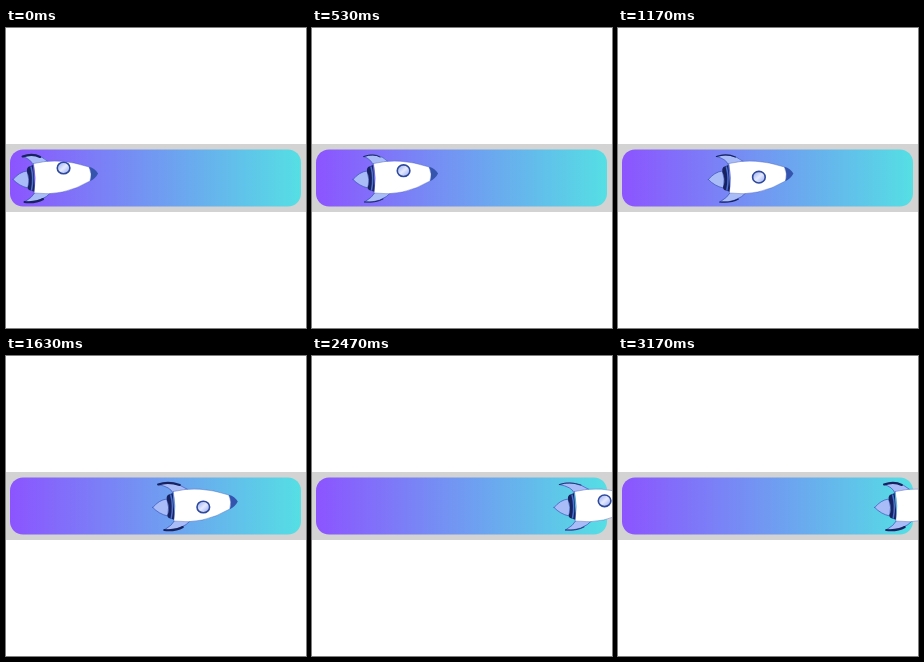
Write an HTML page that moves like this. It is 300 px wide and 300 px high and loops after 3.21 s.

```html
<!DOCTYPE html>
<html lang="en">
<head>
<meta charset="utf-8">
<title>Rocket progress bar</title>
<style>
html, body { margin: 0; width: 100%; height: 100%; overflow: hidden; background: #fff; }
svg { display: block; width: 100vw; height: 100vh; }
</style>
</head>
<body>
<svg viewBox="0 0 300 300">
  <defs>
    <linearGradient id="bar">
      <stop stop-color="#8c54ff"/><stop offset="1" stop-color="#55dfe4"/>
    </linearGradient>
    <linearGradient id="glass" x2="1" y2="1">
      <stop offset=".15" stop-color="#a9b9f5"/><stop offset=".5" stop-color="#e4eafe"/><stop offset=".85" stop-color="#a9b9f5"/>
    </linearGradient>
  </defs>
  <path fill="#d3d3d3" d="M0 116H300V184H0Z"/>
  <rect x="4" y="121.5" width="291" height="57" rx="13" fill="url(#bar)"/>
  <g id="rocket" stroke-linejoin="round" stroke-linecap="round">
    <g fill="#a9bcf8" stroke="#3a55b8" stroke-width=".7">
      <path id="topFin"/>
      <path id="lowFin"/>
      <path d="M0 151.5Q6 144 14 143Q17 151 15 160Q6 158 0 151.5Z"/>
    </g>
    <g fill="none" stroke="#17225f">
      <path id="topEdge"/>
      <path id="lowEdge"/>
    </g>
    <path fill="#17225f" d="M15 139L20 137L22 164L16 162Q13.500 160 15.500 157Q17 150 14 144Q13 141 15 139Z"/>
    <path fill="none" stroke="#4a70d0" stroke-width="1.500" d="M18 139Q21 150 18.500 162"/>
    <path fill="#fff" stroke="#3a55b8" stroke-width=".4" d="M20.500 135.500Q46 129 76 139Q79.500 146 77 153Q50 169 21 165Q23.500 150 20.500 135.500Z"/>
    <path fill="#3554ad" d="M76 138.800Q82 140.500 85 145.500Q82.500 150.500 77 153.200Q79.500 146 76 138.800Z"/>
    <ellipse id="port" cx="50.500" rx="6.300" ry="5.800" fill="url(#glass)" stroke="#2d489c" stroke-width="1.600"/>
  </g>
</svg>
<script>
const LOOP = 3210;
const path = [[0, 7], [530, 41], [1070, 80], [1600, 143], [2130, 209], [2470, 242], [2670, 253], [3210, 257]];
const el = id => document.getElementById(id);
const set = (id, attrs) => { for (const k in attrs) el(id).setAttribute(k, attrs[k]); };

function slope(i) {
  const a = path[Math.max(i - 1, 0)], b = path[Math.min(i + 1, path.length - 1)];
  return (b[1] - a[1]) / (b[0] - a[0]);
}

// Cubic Hermite curve through the path points
function position(t) {
  const i = path.findIndex((p, n) => n > 0 && t <= p[0]) - 1;
  const [t0, x0] = path[i], [t1, x1] = path[i + 1];
  const d = t1 - t0, u = (t - t0) / d, v = 1 - u;
  return v * v * (1 + 2 * u) * x0 + u * u * (3 - 2 * u) * x1
    + d * u * v * (v * slope(i) - u * slope(i + 1));
}

function draw(now) {
  const t = now % LOOP, angle = t / LOOP * Math.PI * 2;
  const c = Math.cos(angle), s = Math.sin(angle);
  const tip = 7.5 + 2.5 * s + 2 * c;
  const edge = 0.8 + 1.3 * Math.abs(c) ** 3;
  const top = `M${tip} 128.500Q${tip + 14} 123.500 35 133.500`;
  const low = "M11.500 174Q28 175.500 39 163.500";

  set("rocket", { transform: `translate(${position(t)})` });
  set("port", { cy: 145.5 - 5.5 * c });
  set("topFin", { d: top + `L20 137Q18 131 ${tip} 128.500Z` });
  set("lowFin", { d: low + "L23 163Q19 170 11.500 174Z" });
  set("topEdge", { d: `M${tip} 128.500Q${tip + 10} 125 27 129`, "stroke-width": edge });
  set("lowEdge", { d: "M11.500 174Q23 175 30 171", "stroke-width": edge });
  requestAnimationFrame(draw);
}
draw(0);
</script>
</body>
</html>
```
